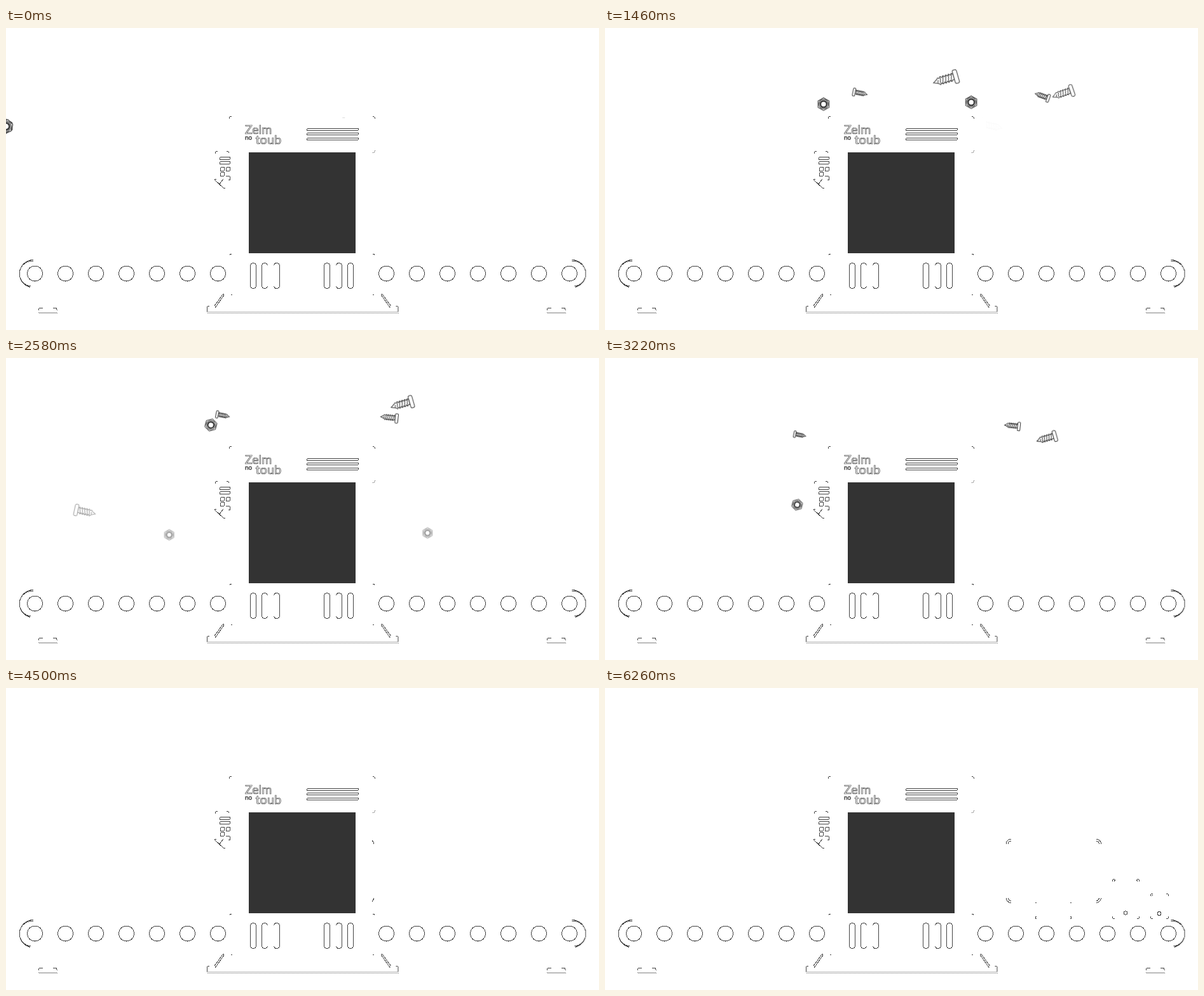
Animation, 933 px wide and 476 px high, one loop 8000 ms. Source, as an HTML page without scripts:

```html
<!DOCTYPE html>
<html lang="en">
<head>
<meta charset="utf-8">
<title>Machine throwing screws</title>
<style>
html, body { margin: 0; width: 100%; height: 100%; overflow: hidden; background: #fff; }
svg { display: block; width: 933px; height: 476px; fill: none; stroke: #444; shape-rendering: crispEdges; }
text { font-family: Lato, sans-serif; fill: #fff; stroke-width: .7; }
.dot { stroke: #777; stroke-dasharray: 1 1; }
.cover { fill: #fff; stroke: none; }
.panel { stroke: none; fill: #333; }
#screw, #nut { stroke: #333; shape-rendering: auto; }
#screw * { vector-effect: non-scaling-stroke; }

/* A part starts at --x at time --at, drifts by --dx, rises to --top, then drops by --fall. */
.part, .part use { animation: 8s var(--at) infinite backwards; }
.part { animation-timing-function: var(--pace, linear), linear; }
.part use { animation-timing-function: linear; }
.fast { animation-name: drift, toss; --fall: 407px; }
.nut { animation-name: drift, lob; --fall: 253px; --pace: cubic-bezier(.333, 1, .667, 1); }
.slow { animation-name: drift, float; }
.fast use { animation-name: fade-fast, spin; }
.nut use { animation-name: fade-nut, shrink; }
.slow use { animation-name: fade-slow, swell; }

@keyframes drift {
  0% { translate: var(--x) }
  42%, 100% { translate: calc(var(--x) + var(--dx)) }
}
@keyframes toss {
  0% { transform: translateY(155px); animation-timing-function: cubic-bezier(.333, .667, .667, 1) }
  6% { transform: translateY(var(--top)); animation-timing-function: cubic-bezier(.333, 0, .667, .333) }
  18%, 100% { transform: translateY(calc(var(--top) + var(--fall))) }
}
@keyframes lob {
  0% { transform: translateY(155px); animation-timing-function: cubic-bezier(.333, .667, .667, 1) }
  8% { transform: translateY(var(--top)); animation-timing-function: cubic-bezier(.333, 0, .667, .333) }
  26%, 100% { transform: translateY(calc(var(--top) + var(--fall))) }
}
@keyframes float {
  0% { transform: translateY(155px); animation-timing-function: cubic-bezier(.1, .55, .4, .95) }
  17% { transform: translateY(var(--top)); animation-timing-function: cubic-bezier(.333, 0, .667, .333) }
  42%, 100% { transform: translateY(calc(var(--top) + var(--fall))) }
}
@keyframes fade-fast { 0% { opacity: 0 } .5%, 11% { opacity: 1 } 17%, 100% { opacity: 0 } }
@keyframes fade-nut { 0%, 19% { opacity: 1 } 26%, 100% { opacity: 0 } }
@keyframes fade-slow { 0%, 33% { opacity: 1 } 36.5%, 100% { opacity: 0 } }
@keyframes spin { 17%, 100% { rotate: var(--spin, 0deg) } }
@keyframes shrink { 0% { scale: 1.1 } 26%, 100% { scale: .8 } }
@keyframes swell { 0% { scale: .8 } 10% { scale: 1 } 36%, 100% { scale: .7 } }

.slide { animation: slide 8s infinite; }
@keyframes slide {
  0%, 56% { translate: var(--from); animation-timing-function: ease-out }
  78.25%, 100% { translate: 0 }
}
</style>
</head>
<body>
<svg viewBox="0 0 933 476">
<defs>
  <g id="screw">
    <path fill="#fff" d="M11-4l-2-2-2 2-2-2-2 2-2-2-2 2-2-2-2 2-2-2-2 2-2-1-2 2-5 3 5 2 2 1 2 2 2-2 2 2 2-2 2 2 2-2 2 2 2-2 2 2 2-2 2 1z"/>
    <path d="M9-5l-3 10M5-5l-3 10M1-5l-3 10M-3-5l-3 10M-7-4l-2 7M-11-2l-1 4"/>
    <rect x="11" y="-9.500" width="5.800" height="19" rx="2" fill="#fff"/>
  </g>
  <g id="nut">
    <path fill="#fff" stroke-linejoin="round" d="M0-10l8.700 5v10l-8.700 5-8.700-5v-10z"/>
    <circle r="7.500"/>
    <circle r="5" stroke-width="2.500"/>
  </g>
  <path id="arc" d="M0 4a4 4 0 0 1 4-4"/>
  <path id="corner" d="M0 8a8 8 0 0 1 8-8M3 8a5 5 0 0 1 5-5"/>
  <rect id="vent" y="370.500" width="9" height="40" rx="4.500"/>
  <rect id="slot" x="473.500" width="81" height="3" rx="1.500"/>
  <rect id="bar" x="336.500" width="16" height="4" rx="1.500"/>
  <rect id="key" width="6" height="6" rx="1.500"/>
  <g id="foot">
    <path d="M.5 445v-1q0-3 3-3h3M23 441h3q3 0 3 3v1"/>
    <path class="dot" d="M0 448.500h30M1 449.500h29"/>
  </g>
  <g id="trio"><circle r="12"/><circle cx="48" r="12"/><circle cx="96" r="12"/></g>
  <g id="row"><use href="#trio"/><use href="#trio" x="144"/><circle cx="288" r="12"/></g>
  <g id="half">
    <path d="M43 365.500a21.800 21.800 0 0 0-5 43M43 367.500a19.800 19.800 0 0 0-4 39.500"/>
    <path d="M328 438l13-18q2-2 2 1l-14 20M316 447v-6q0-3 4-3"/>
  </g>
</defs>

<!-- devices sliding out -->
<g class="slide" style="--from:-206px">
  <path class="cover" d="M631 238h149v100h-149z"/>
  <use href="#corner" x="631" y="238"/>
  <use href="#corner" transform="translate(780.500 238) scale(-1 1)"/>
  <use href="#corner" transform="translate(631 338.500) scale(1 -1)"/>
  <use href="#corner" transform="translate(780.500 338.500) scale(-1)"/>
  <path d="M677 338.500h2M732 338.500h2M679 360a2 2 0 1 0 0 4M732 360a2 2 0 1 1 0 4"/>
</g>
<g class="slide" style="--from:-275px">
  <path class="cover" d="M798 301h43v63h-43z"/>
  <path d="M798 305a4 4 0 0 1 4-4M801 305l2-3M837 301a4 4 0 0 1 4 4M836 302l2 3M798 360a4 4 0 0 0 4 4M837 364a4 4 0 0 0 4-4"/>
  <circle cx="819" cy="354.500" r="2.700"/>
</g>
<g class="slide" style="--from:-322px">
  <path class="cover" d="M858 324h29v40h-29z"/>
  <path d="M858 328a4 4 0 0 1 4-4M860 328l2-2M883 324a4 4 0 0 1 4 4M858 360a4 4 0 0 0 4 4M883 364a4 4 0 0 0 4-4"/>
  <circle cx="872" cy="355.500" r="2.800"/>
</g>

<!-- thrown parts -->
<g class="part fast" style="--at:.58s; --x:415px; --dx:1168px; --top:32px; --spin:-29deg"><use href="#screw"/></g>
<g class="part fast" style="--at:.62s; --x:574px; --dx:457px; --top:50px"><use href="#screw" transform="rotate(20) scale(.68)"/></g>
<g class="part fast" style="--at:1.46s; --x:608px; --dx:-1452px; --top:61px"><use href="#screw" transform="rotate(12) scale(-.96 .96)"/></g>
<g class="part slow" style="--at:.84s; --x:520px; --dx:310px; --top:64px; --fall:240px; --pace:ease-in"><use href="#screw" transform="rotate(-16) scale(1.200)"/></g>
<g class="part slow" style="--at:.92s; --x:430px; --dx:-181px; --top:87px; --fall:156px"><use href="#screw" transform="rotate(11) scale(-.7 .7)"/></g>
<g class="part slow" style="--at:1.5s; --x:540px; --dx:198px; --top:92px; --fall:460px"><use href="#screw" transform="rotate(6) scale(.82)"/></g>
<g class="part nut" style="--at:.8s; --x:445px; --dx:-210px; --top:120px"><use href="#nut"/></g>
<g class="part nut" style="--at:.8s; --x:475px; --dx:210px; --top:117px"><use href="#nut"/></g>
<g class="part nut" style="--at:1.86s; --x:360px; --dx:-73px; --top:104px; --fall:508px"><use href="#nut" transform="rotate(15)"/></g>

<!-- machine -->
<path class="cover" d="M334 141.500h266v55h-24v225h-226v-225h-16z"/>
<use href="#arc" x="351" y="139"/>
<use href="#arc" transform="translate(580.500 139) scale(-1 1)"/>
<use href="#arc" transform="translate(580.500 196.500) scale(-1)"/>
<path d="M352 358q0-2 3-2M577 356q3 0 3 2M354 420.500h2M577 420.500h2"/>
<text x="376" y="167" font-size="19.500">Zelm</text>
<text x="392.500" y="183" font-size="20">toub</text>
<text x="376" y="176" font-size="10">no</text>
<use href="#slot" y="158.500"/>
<use href="#slot" y="165.500"/>
<use href="#slot" y="173.500"/>
<path class="panel" d="M382 196h168v159h-168z"/>

<!-- side module -->
<path d="M329 198q0-4 4-4M347 194q4 0 4 3M331 238q-3 0-2 2l13 12h3M342 238l-7 9"/>
<use href="#bar" y="203.500"/>
<use href="#bar" y="210.500"/>
<use href="#key" x="337.500" y="219.500"/>
<use href="#key" x="346.500" y="219.500"/>
<use href="#key" x="337.500" y="227.500"/>
<path d="M346 233.500h4q2.500 0 2.500 2.500v3h-3"/>

<!-- vents -->
<use href="#vent" x="384.500"/>
<use href="#vent" x="500.500"/>
<use href="#vent" x="537.500"/>
<path id="hook" d="M421.500 374q1-3.500 4-3.500 5 0 5 5v30q0 5-5 5-3 0-4-3.500"/>
<use href="#hook" x="98"/>
<use href="#hook" transform="translate(833) scale(-1 1)"/>

<!-- conveyor and base -->
<use href="#row" x="45.500" y="387"/>
<use href="#row" x="598.500" y="387"/>
<use href="#half"/>
<use href="#half" transform="translate(933.500) scale(-1 1)"/>
<path class="dot" d="M316 447.500h302M317 449.500h301"/>
<use href="#foot" x="51"/>
<use href="#foot" x="851"/>
</svg>
</body>
</html>
```
